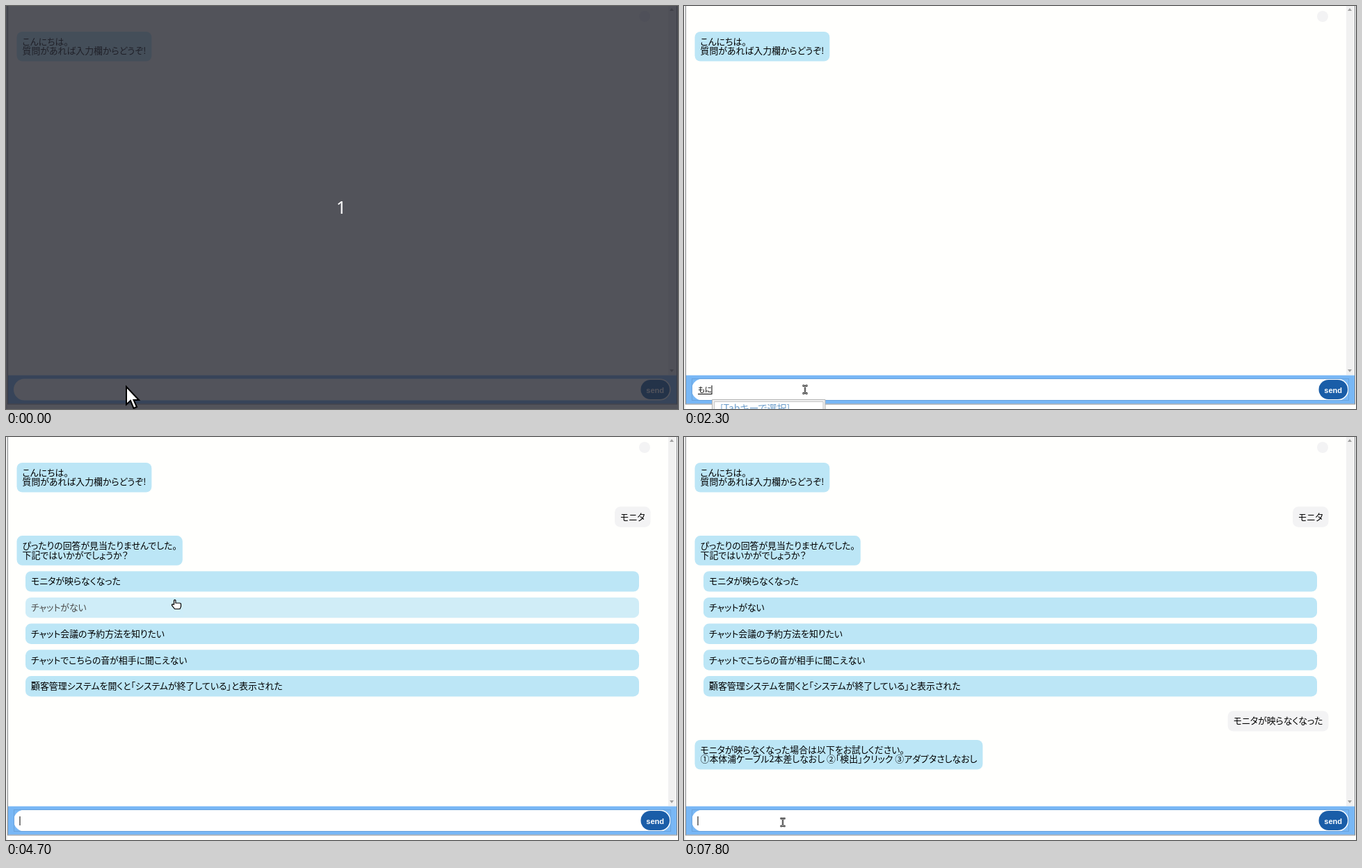
Animation of 966 by 580 pixels, one loop 8000 ms. Source, as an HTML page:

```html
<!DOCTYPE html>
<html lang="ja">
<head>
<meta charset="utf-8">
<style>
html, body { margin: 0; width: 100%; height: 100%; overflow: hidden; background: #fffffd; }
svg { display: block; }
text { font: 12.9px "Noto Sans CJK JP", "Noto Sans CJK", sans-serif; font-feature-settings: "palt"; white-space: pre; }
#send { font: bold 11px "Liberation Sans", sans-serif; fill: #fff; }
#typed { font-size: 10.4px; }
#count { font: 500 25px "Noto Sans", sans-serif; fill: #fff; }
#hint { font-size: 14px; fill: #6f9fcc; }
</style>
</head>
<body>
<svg id="stage" width="966" height="580" viewBox="0 0 966 580">
  <path d="M0 0H2V580H0Z" fill="#ececec"/>
  <path d="M952 0H964V531H952Z" fill="#f1f1f1"/>
  <path d="M954 7h6l-3-4zM954 523h6l-3 4z" fill="#a0a0a0"/>
  <circle cx="918" cy="15" r="8" fill="#f3f3f4"/>
  <g id="chat"></g>
  <path d="M3 531.5H964V572.5H3Z" fill="#78b7f5"/>
  <path d="M2.5 0V573M964.5 0V573M2 573H965" stroke="#85888c" fill="none"/>
  <rect x="11" y="536.5" width="944.5" height="31" rx="15.5" fill="#fff"/>
  <rect id="ring" x="11.5" y="536.5" width="944" height="31" fill="none" stroke="#6aa3dc"/>
  <rect x="912.5" y="538" width="41.5" height="28" rx="14" fill="#1a5da8"/>
  <text id="send" x="933.2" y="556.5" text-anchor="middle">send</text>
  <text id="typed" x="20" y="556"></text>
  <path id="underline" stroke="#000"/>
  <path id="caret" d="M.5 546V559" stroke="#000"/>
  <g id="popup">
    <path d="M.5 590V566.5H163V590" fill="#f0f0f0" stroke="#b4b4b4"/>
    <path d="M3.5 590V569.5H160V590" fill="#fff" stroke="#c4c4c4"/>
    <text id="hint" x="12" y="584">[Tabキーで選択]</text>
  </g>
  <g id="overlay">
    <rect width="966" height="580" fill="rgb(39,41,50)" opacity=".8"/>
    <text id="count" x="482" y="299" text-anchor="middle">1</text>
  </g>
  <path id="arrow" d="M0 0V25.5L6 20L10.5 31L15 29L10.5 19H18Z" fill="#fff" stroke="#000" stroke-width="2"/>
  <g id="beam" fill="none">
    <path d="M-3.5-5.5H-1.5L0-4.5L1.5-5.5H3.5M0-4.5V4.5M-3.5 5.5H-1.5L0 4.5L1.5 5.5H3.5" stroke="#000" stroke-width="2.3"/>
    <path d="M-3-5.5H-1.5L0-4.5L1.5-5.5H3M0-4.5V4.5M-3 5.5H-1.5L0 4.5L1.5 5.5H3" stroke="#fff" stroke-width=".8"/>
  </g>
  <path id="hand" d="M-3.5 0V-5.5a1.2 1.2 0 0 1 2.4 0V-2H4.5q2 0 2 2V3L5 6.5H-2.5L-6.3 1.7q-1-2 1-2Z" fill="#fff" stroke="#000" stroke-width="1.2"/>
</svg>
<script>
const $ = id => document.getElementById(id);
const show = (node, on) => { node.style.display = on ? '' : 'none'; };

// Chat bubbles flow downwards; the text sets the size of each one
const LINE = 13.33, PAD = 8;
const GAP = { bot: 12.4, user: 20.8, row: 8.4 };
const bubbles = [];
let bottom = 24.5;

function bubble(start, kind, ...lines) {
  const node = document.createElementNS('http://www.w3.org/2000/svg', 'g');
  const top = bottom + GAP[kind], height = 2 * PAD + LINE * lines.length;
  node.innerHTML = '<rect/>' + lines.map(s => `<text>${s}</text>`).join('');
  $('chat').append(node);

  const [rect, ...texts] = node.children;
  const fit = Math.max(...texts.map(s => s.getComputedTextLength())) + 2 * PAD;
  const width = kind === 'row' ? 882 : fit;
  const left = { bot: 15.5, user: 926.5 - width, row: 28 }[kind];
  const set = (el, attrs) => Object.entries(attrs).forEach(([k, v]) => el.setAttribute(k, v));
  set(rect, { x: left, y: top, width, height, rx: 8, fill: kind === 'user' ? '#f3f3f4' : '#bce6f6' });
  texts.forEach((el, i) => set(el, { x: left + PAD, y: top + 19.2 + LINE * i }));
  bottom = top + height;
  bubbles.push({ node, start, kind, top, bottom });
}

bubble(0, 'bot', 'こんにちは。', '質問があれば入力欄からどうぞ!');
bubble(3400, 'user', 'モニタ');
bubble(4200, 'bot', 'ぴったりの回答が見当たりませんでした。', '下記ではいかがでしょうか？');
for (const s of [
  'モニタが映らなくなった',
  'チャットがない',
  'チャット会議の予約方法を知りたい',
  'チャットでこちらの音が相手に聞こえない',
  '顧客管理システムを開くと「システムが終了している」と表示された'
]) bubble(4300, 'row', s);
bubble(5900, 'user', 'モニタが映らなくなった');
bubble(6100, 'bot', 'モニタが映らなくなった場合は以下をお試しください。', '①本体浦ケーブル2本差しなおし ②「検出」クリック ③アダプタさしなおし');

// One keystroke every 100 ms, the last one converts the word
const TYPE = 2000, CONVERT = 2600, ACCEPT = 3200, SUBMIT = 3400;
const keys = ['ｍ', 'も', 'もｎ', 'もに', 'もに', 'もにた', 'モニタ'];
const typedAt = t => t < TYPE || t >= SUBMIT ? '' : keys[Math.min(keys.length - 1, (t - TYPE) / 100)];

const FOCUS = 700, BLUR = 5900, REFOCUS = 7800;
const focused = t => t >= FOCUS && t < BLUR || t >= REFOCUS;
function caretOn(t) {
  if (t >= TYPE && t < SUBMIT) return t < CONVERT || t >= ACCEPT;
  const since = [REFOCUS, SUBMIT, FOCUS].find(s => t >= s);
  return focused(t) && (t - since) % 1000 < 500;
}

const moves = [
  { from: 4400, to: 4700, x: 245, y: 241 },
  { from: 4700, to: 5000, x: 229, y: 206 },
  { from: 6700, to: 7600, x: 142, y: 554.5 }
];
function mouse(t) {
  let x = 174, y = 552;
  for (const m of moves) {
    const k = Math.min(1, Math.max(0, (t - m.from) / (m.to - m.from)));
    const ease = k * k * (3 - 2 * k);
    x += (m.x - x) * ease;
    y += (m.y - y) * ease;
  }
  return [x, y];
}

function draw(t) {
  const intro = t < 200;
  const [x, y] = mouse(t);
  let hovering = false;
  for (const b of bubbles) {
    const over = b.kind === 'row' && t >= b.start && y >= b.top && y < b.bottom;
    hovering ||= over;
    show(b.node, t >= b.start);
    b.node.setAttribute('opacity', over ? .7 : 1);
  }

  const cursor = hovering ? 'hand' : y > 536 && !intro ? 'beam' : 'arrow';
  for (const id of ['arrow', 'beam', 'hand']) show($(id), id === cursor);
  const scale = cursor === 'arrow' && !intro ? .6 : 1;
  $(cursor).setAttribute('transform', intro ? 'translate(173 548)' : `translate(${x} ${y}) scale(${scale})`);
  show($('overlay'), intro);

  const text = typedAt(t);
  $('typed').textContent = text;
  const end = 20 + (text && Math.round($('typed').getComputedTextLength()));
  $('caret').setAttribute('transform', `translate(${end - .5})`);
  show($('caret'), caretOn(t));
  $('underline').setAttribute('d', `M20 558.5H${end}`);
  $('underline').setAttribute('stroke-width', t >= CONVERT ? 2 : 1);
  show($('underline'), text && t < ACCEPT);
  show($('popup'), /[もにた]$/.test(text));
  $('popup').setAttribute('transform', `translate(${end})`);
  show($('ring'), focused(t));
}

function tick(now) {
  draw(Math.floor(now % 8000 / 100) * 100);
  requestAnimationFrame(tick);
}
draw(0);
requestAnimationFrame(tick);
</script>
</body>
</html>
```
